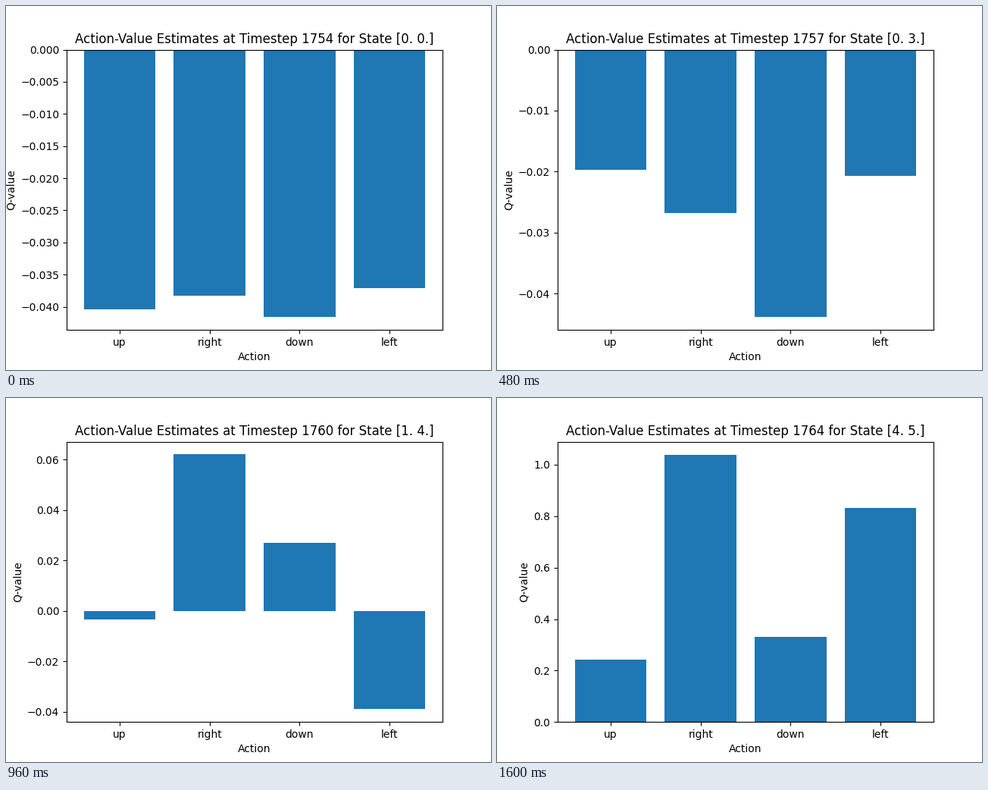
A matplotlib script for the animation above (1.76 s loop, 640x480 px).

```python
import matplotlib.pyplot as plt
import numpy as np
from matplotlib.animation import FuncAnimation

FIRST_STEP = 1754
MOVES = "uuuu.rurrr"  # u: y + 1, r: x + 1, dot: blocked by the wall
UPDATE = 0.0003       # value change after a blocked move

# Action values are curves along the walk, through a few key points.
KEY_MOVES = [0, 1, 3, 4, 5, 7, 9]
CURVES = {
    "up": [-0.0404, -0.0334, -0.0197, 0.0005, -0.0033, 0.066, 0.242],
    "right": [-0.0383, -0.0431, -0.0268, 0.0082, 0.0621, 0.4626, 1.0377],
    "down": [-0.04154, -0.0413, -0.0438, -0.0261, 0.027, 0.26, 0.33],
    "left": [-0.0371, -0.0322, -0.0207, -0.0028, -0.03895, 0.205, 0.831],
}

fig, ax = plt.subplots(figsize=(6.4, 4.8), dpi=100)


def draw(index):
    walked = MOVES[:index]
    x, y = walked.count("r"), walked.count("u")
    shift = UPDATE if walked.endswith(".") else 0
    values = [np.interp(x + y, KEY_MOVES, curve) + shift
              for curve in CURVES.values()]

    ax.clear()
    ax.bar(list(CURVES), values, color="#1f77b4")
    ax.set_title(f"Action-Value Estimates at Timestep {FIRST_STEP + index} "
                 f"for State [{x}. {y}.]")
    ax.set_xlabel("Action")
    ax.set_ylabel("Q-value")


anim = FuncAnimation(fig, draw, frames=len(MOVES) + 1, interval=160,
                     init_func=lambda: draw(0), repeat=True, repeat_delay=0)
plt.show()
```
